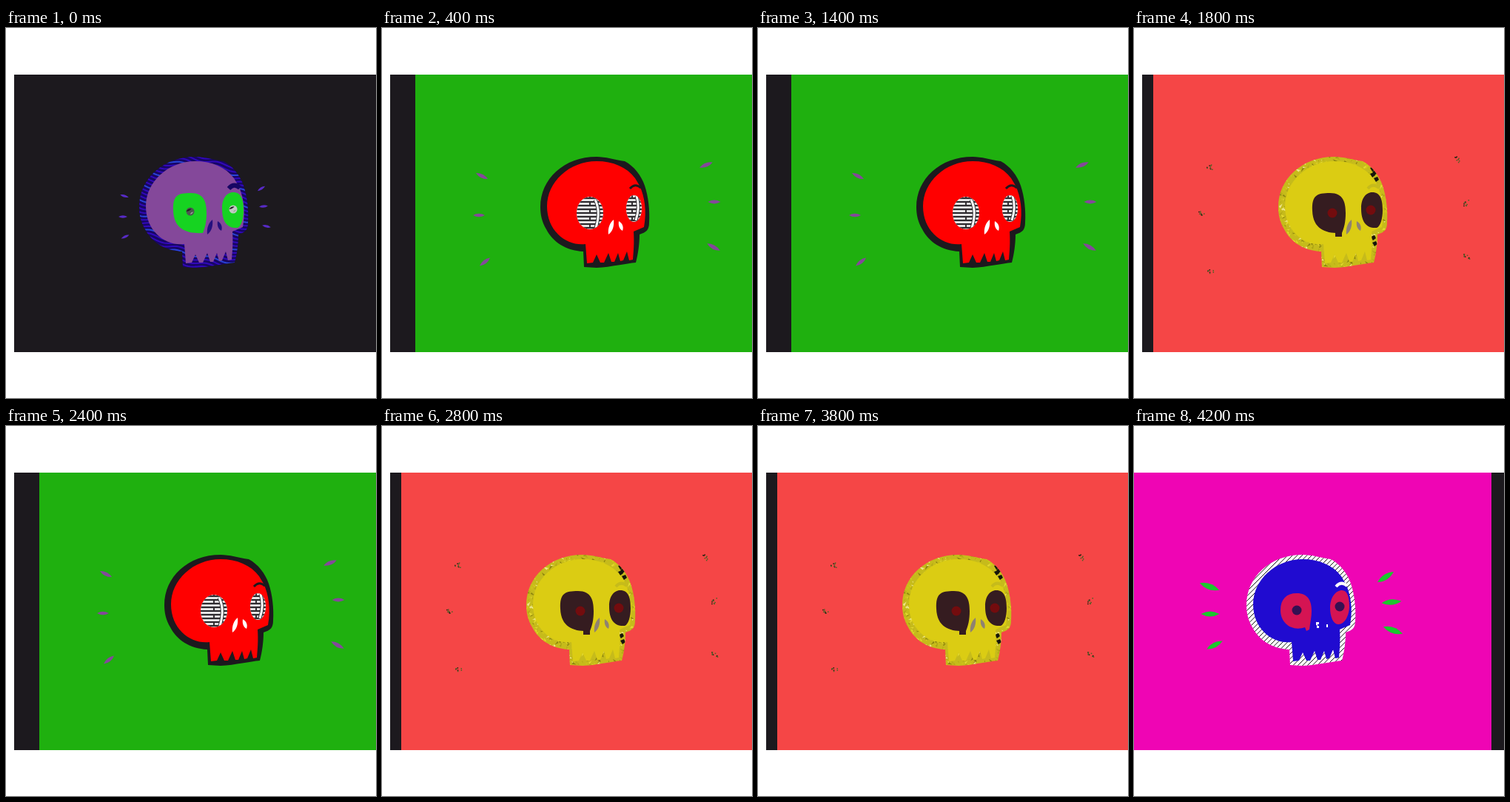
Recreate the animation shown at these times as an HTML page with a canvas. Size 500x500 px, loop 4.4 s.

```html
<!DOCTYPE html>
<html lang="en">
<head>
<meta charset="utf-8">
<title>Skull flicker</title>
<style>
  html, body { margin: 0; width: 100%; height: 100%; overflow: hidden; background: #fff; }
  canvas { display: block; width: 500px; height: 500px; }
</style>
</head>
<body>
<canvas id="stage" width="500" height="500"></canvas>
<script>
const ctx = document.getElementById('stage').getContext('2d');
const LOOP = 4400, STEP = 200, DARK = '#1c191e';

// Skull parts, drawn for a panel whose left edge is at x = 45.
const HEAD = new Path2D('M214 242C214 204 246 174 290 174C302 174 314 178 328 180C341 187 350 199 355 213C360 228 362 246 361 263C361 273 357 276 348 279C348 292 346 306 343 317C330 318 310 323 290 324L273 323L272 302C248 301 231 289 222 272C216 262 214 252 214 242Z');
const FACE = new Path2D('M223 241C223 208 253 180 290 180C312 180 331 188 342 203L348 213C355 228 358 247 354 269L340 275C341 290 340 301 339 313L334 314L331 302L326 314L322 315L319 304L314 316L310 316L306 304L300 317L295 317L290 306L285 317L277 318L275 292C250 295 223 275 223 241Z');
const EYES = new Path2D('M260 247C259 226 266 223 284 223C302 223 305 236 305 250C305 262 303 270 300 277C281 278 261 274 260 247ZM326 244C326 228 334 222 341 222C352 222 355 232 355 246C355 258 352 268 347 270C333 271 326 262 326 244Z');
const ROUND_EYES = new Path2D('M260 249C260 234 268 226 282 226C297 226 302 236 302 250C302 258 300 266 299 275L295 277L293 272C276 278 260 267 260 249ZM327 246C327 231 335 222 343 222C350 222 353 231 353 243C353 256 347 268 338 268C331 268 327 257 327 246Z');
const SLIM_EYES = new Path2D('M263 250A18 22 0 1 1 299 250A18 22 0 1 1 263 250ZM330 244A10.500 18 0 1 1 351 244A10.500 18 0 1 1 330 244Z');
const NOSE = new Path2D('M306 279C305 270 308 263 313 259C314 267 312 275 306 279ZM320 261C325 264 327 269 325 274C321 272 319 267 320 261Z');
const BROW = new Path2D('M335 217Q342 209 350 216');

function fill(color, path) {
  ctx.fillStyle = color;
  ctx.fill(path);
}

function stroke(color, width, path) {
  ctx.strokeStyle = color;
  ctx.lineWidth = width;
  ctx.stroke(path);
}

function clipped(path, draw) {
  ctx.save();
  ctx.clip(path);
  draw();
  ctx.restore();
}

function seeded(seed) {
  return () => (seed = (seed * 16807) % 2147483647) / 2147483647;
}

function dot(x, y, r, color) {
  ctx.fillStyle = color;
  ctx.beginPath();
  ctx.arc(x, y, r, 0, Math.PI * 2);
  ctx.fill();
}

function pupils(r, color) {
  dot(282, 249, r, color);
  dot(340, 244, r, color);
}

function leaf(x, y, degrees, length, color) {
  ctx.save();
  ctx.translate(x, y);
  ctx.rotate(degrees * Math.PI / 180);
  const h = length / 2, w = length * 0.28;
  fill(color, new Path2D(`M${-h} 0Q0 ${-w} ${h} 0Q0 ${w} ${-h} 0Z`));
  ctx.restore();
}

function specks(x, y, seed) {
  const rnd = seeded(seed * 977 + 31);
  for (let i = 0; i < 9; i++) {
    ctx.fillStyle = i % 3 ? '#4a6324' : '#17200f';
    ctx.fillRect(x - 4 + rnd() * 8, y - 4 + rnd() * 8, 1.5, 1.5);
  }
}

// Rim textures
function waves() {
  for (let i = 0; i < 48; i++) {
    const path = new Path2D();
    for (let x = 205; x <= 370; x += 3) {
      path.lineTo(x, 110 + i * 5 + (x - 205) * 0.2 + Math.sin(x / 7 + i * 0.3) * 2);
    }
    stroke(i % 4 ? '#3208ba' : '#2945d8', 2, path);
  }
}

function hatch() {
  for (let x = 0; x < 370; x += 6.5) {
    stroke('#111', 1, new Path2D(`M${x + 30} 330L${x + 190} 170`));
  }
}

function shards() {
  const rnd = seeded(73);
  const colors = ['#8d850f', '#e4d92f', '#b5aa16', '#eee68a', '#d4c718'];
  for (let i = 0; i < 1100; i++) {
    const x = 210 + rnd() * 155, y = 170 + rnd() * 156;
    const dx = rnd() * 10 - 5, dy = rnd() * 10 - 5;
    fill(colors[i % 5], new Path2D(`M${x} ${y}l${dx} ${dy}l${dy / 2} ${-dx / 2}Z`));
  }
  for (const [x, y] of [[341, 191], [344, 196], [341, 199], [346, 205], [342, 284], [344, 292]]) {
    fill('#16150a', new Path2D(`M${x - 3} ${y - 2}l5 -2l2 4l-4 3Z`));
  }
}

// Eye details
function balls() {
  for (const [x, y] of [[283, 248], [341, 245]]) {
    dot(x, y, 5.5, x < 300 ? '#4c5750' : '#c2cbc3');
    leaf(x - 2, y - 2, -25, 8, '#231c22');
    leaf(x + 2, y + 2, -35, 6, '#a2a5a1');
  }
}

function stripes() {
  clipped(SLIM_EYES, () => {
    for (let y = 225; y < 275; y += 5) {
      stroke('#302d31', 2.3, new Path2D(`M260 ${y}H355`));
      if (y % 10) stroke('#302d31', 2, new Path2D(`M281 ${y}v5M338 ${y}v5`));
    }
    const arcs = new Path2D('M288 232Q296 248 289 270M344 227Q349 242 343 260');
    stroke('#302d31', 5, arcs);
    stroke('#fff', 3, arcs);
  });
}

// Rays are [x, y, degrees, length] in stage coordinates.
const scenes = [
  { left: 11, panel: DARK, rim: '#170664', texture: waves, face: '#84489a',
    eyes: EYES, eye: '#16d321', detail: balls, nose: '#25107f', brow: 6, ray: '#582bc8',
    rays: [[160, 227, 17, 12], [158, 255, 0, 12], [161, 282, -25, 12],
           [345, 217, -32, 12], [348, 241, -5, 12], [352, 268, 12, 12]] },
  { left: -17, panel: '#ef05b4', rim: '#fff', texture: hatch, face: '#200bd0',
    eyes: ROUND_EYES, eye: '#d51453', detail: () => pupils(6.5, '#351052'), brow: 4, ray: '#1cc72d',
    rays: [[102, 217, 20, 28], [103, 254, 0, 25], [109, 296, -27, 24],
           [340, 204, -33, 26], [348, 238, -5, 27], [350, 276, 20, 28]] },
  { left: 45, panel: '#1fb00f', rim: DARK, face: '#f00',
    eyes: SLIM_EYES, eye: '#fff', detail: stripes, nose: '#fff', brow: 3, ray: '#84489a',
    rays: [[135, 200, 27, 18], [131, 253, 0, 16], [139, 316, -38, 18],
           [438, 185, -22, 19], [449, 235, 0, 17], [448, 296, 29, 20]] },
  { left: -8, panel: '#f2cf12', rim: DARK, face: '#1fb00f',
    eyes: EYES, eye: '#ef05b4', detail: () => pupils(6, DARK), nose: DARK, brow: 3, ray: '#200bd0',
    rays: [[95, 207, 22, 22], [88, 253, 0, 20], [94, 306, -30, 20],
           [377, 190, -27, 22], [389, 236, 0, 20], [386, 288, 24, 22]] },
  { left: 26, panel: '#f54646', rim: '#c6bb1b', texture: shards, face: '#dbcc13',
    eyes: EYES, eye: '#351c20', nose: '#8f8271', brow: 4,
    detail() {
      ctx.fillStyle = '#351c20';
      ctx.fillRect(291, 274, 9, 8);
      ctx.fillRect(341, 258, 8, 11);
      pupils(0, '#000');
      dot(287, 250, 6.5, '#730c0e');
      dot(339, 246, 6.5, '#730c0e');
    },
    rays: [[102, 187], [91, 251], [103, 327], [437, 177], [449, 236], [449, 308]] }
];

function drawScene(s) {
  ctx.fillStyle = '#fff';
  ctx.fillRect(0, 0, 500, 500);
  ctx.fillStyle = DARK;
  ctx.fillRect(11, 63, 489, 375);
  ctx.fillStyle = s.panel;
  ctx.fillRect(s.left, 63, 500, 375);

  s.rays.forEach(([x, y, degrees, length], i) => {
    if (s.ray) leaf(x, y, degrees, length, s.ray);
    else specks(x, y, i + 1);
  });

  ctx.save();
  ctx.translate(s.left - 45, 0);
  fill(s.rim, HEAD);
  if (s.texture) clipped(HEAD, s.texture);
  fill(s.face, FACE);
  stroke(s.rim, s.brow, BROW);
  fill(s.eye, s.eyes);
  s.detail();
  if (s.nose) {
    fill(s.nose, NOSE);
  } else {
    fill('#fff', new Path2D('M308 265h4v3h-2v2h2v3h-3v-4h-1ZM322 268h2v4h-2Z'));
  }
  ctx.restore();
}

let shown = -1;
function tick() {
  const index = Math.floor(performance.now() % LOOP / STEP) % scenes.length;
  if (index !== shown) drawScene(scenes[shown = index]);
  requestAnimationFrame(tick);
}
tick();
</script>
</body>
</html>
```
